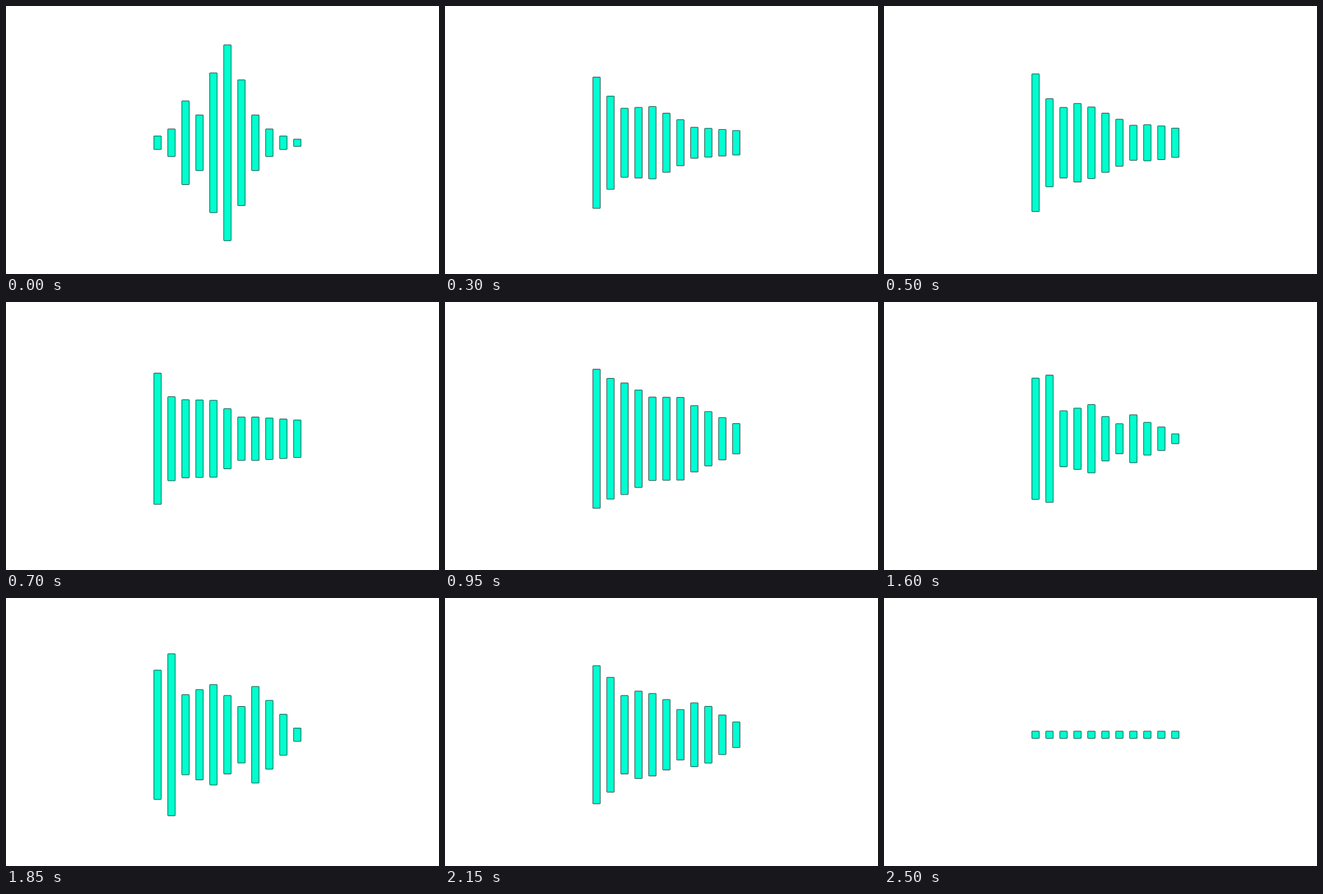
An HTML page with a canvas that plays this animation: 660 px wide and 409 px high, repeating every 2.55 s.

```html
<!DOCTYPE html>
<html lang="en">
<head>
<meta charset="utf-8">
<title>Equalizer</title>
<style>
  html, body { margin: 0; width: 100%; height: 100%; overflow: hidden; background: #fff; }
  canvas { display: block; }
</style>
</head>
<body>
<canvas id="stage" width="660" height="409"></canvas>
<script>
const ctx = document.getElementById('stage').getContext('2d');
const LOOP = 2550, STEP = 50;
const BARS = 11, LEFT = 225, PITCH = 21.3, WIDTH = 12, MID = 208.7, MIN = 11.8;
const EDGE = 0.7;

const lerp = (a, b, u) => a + (b - a) * u;

// Piecewise linear curve through (xs[i], ys[i])
function curve(xs, ys, x) {
  const i = Math.max(1, xs.findIndex(k => k >= x));
  return lerp(ys[i - 1], ys[i], (x - xs[i - 1]) / (xs[i] - xs[i - 1]));
}

// A spectrum is shaped by its heights at a few bands.
const bands = [0, 1, 2, 4, 6, 7, 10];
const spectrum = (...levels) => bar => curve(bands, levels, bar);

const rest = bar => 21.4 * [1, 2, 6, 4, 10, 14, 9, 4, 2, 1, 0.5][bar];
const attack = spectrum(201, 143, 106, 111, 71, 48, 38);
const steady = spectrum(201, 129, 120, 118, 67, 67, 58);
const swell = spectrum(213, 185, 171, 128, 127, 102, 47);
const dip = spectrum(190, 133, 63, 57, 12, 12, 12);
const beat = spectrum(198, 248, 123, 154, 87, 148, 21);
const silence = () => MIN;

const score = [
  [0, rest], [50, rest], [200, attack], [300, attack], [700, steady], [950, swell],
  [1400, dip], [1850, beat], [2400, steady], [2500, silence], [LOOP, silence]
];

function height(bar, t) {
  const n = score.findIndex(([time]) => time > t);
  const [t0, from] = score[n - 1], [t1, to] = score[n];
  const u = (t - t0) / (t1 - t0);
  const flutter = 0.06 * Math.sin(Math.PI * u) * Math.sin(t / 37 + bar * 2.3);
  return Math.max(MIN, lerp(from(bar), to(bar), u) * (1 + flutter));
}

function drawBar(bar, t) {
  const h = height(bar, t);
  ctx.beginPath();
  ctx.roundRect(LEFT + bar * PITCH + EDGE / 2, MID - h / 2 + EDGE / 2, WIDTH - EDGE, h - EDGE, 0.6);
  ctx.fill();
  ctx.stroke();
}

function draw(now) {
  const t = Math.floor((now % LOOP) / STEP) * STEP;
  ctx.clearRect(0, 0, 660, 409);
  ctx.fillStyle = '#00ffd0';
  ctx.strokeStyle = '#000';
  ctx.lineWidth = EDGE;
  for (let bar = 0; bar < BARS; bar++) drawBar(bar, t);
}

let start;
function tick(now) {
  start ??= now;
  draw(now - start);
  requestAnimationFrame(tick);
}
draw(0);
requestAnimationFrame(tick);
</script>
</body>
</html>
```
